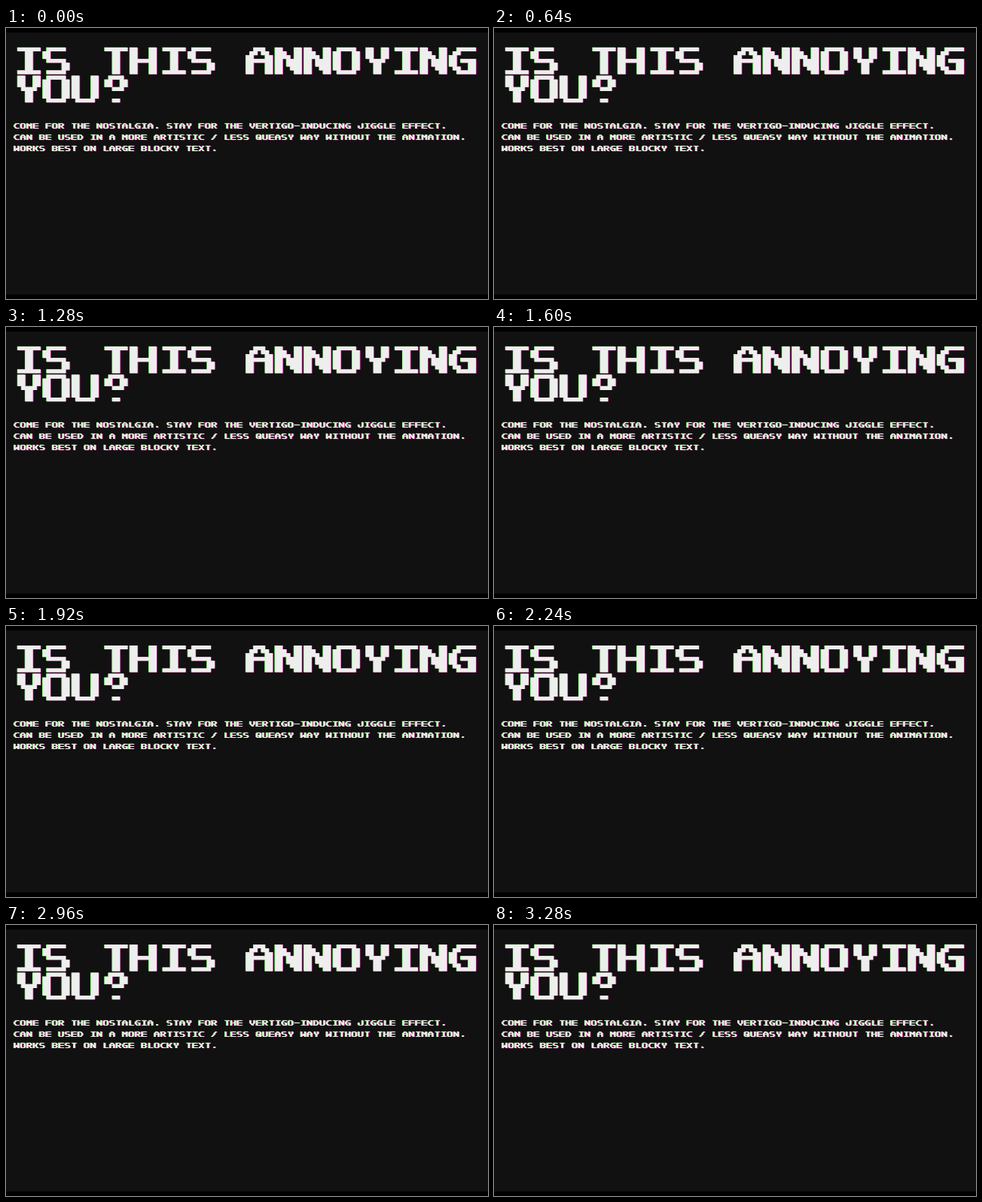
Write an HTML page with a canvas that moves like this. It is 640 px wide and 361 px high and loops after 3360 ms.

```html
<!DOCTYPE html>
<html lang="en">
<head>
<meta charset="utf-8">
<title>Is this annoying you?</title>
<style>
  html, body { margin: 0; width: 100%; height: 100%; overflow: hidden; background: #000; }
  canvas { display: block; width: 640px; height: 361px; }
</style>
</head>
<body>
<canvas id="stage" width="640" height="361" role="img"></canvas>
<script>
const stage = document.getElementById('stage');
const ctx = stage.getContext('2d');

// Each letter is a path over nine anchors, a b c / d e f / g h i.
// A capital anchor has its corner cut off.
const paths = {
  A: 'gACi df', B: 'gaCFd dFIg', C: 'cAGi', D: 'gaCIg', E: 'cagi df',
  F: 'cag df', G: 'cAGife', H: 'ag ci df', I: 'ac gi bh', J: 'cIGd',
  K: 'ag cei de', L: 'agi', M: 'gaeci', N: 'gaic', O: 'dACIGd',
  Q: 'dACIGd ei', R: 'gaCFd ei', S: 'CADFIG', T: 'ac bh', U: 'aGIc',
  V: 'adhfc', W: 'ageic', X: 'ai cg', Y: 'aDFc eh',
  ',': 'Eh', '.': 'Eh', '-': 'df', '/': 'cg', '?': 'DACFe h'
};
const NARROW = 'ILTY?', DEEP_CUT = 'ACDG,.';

function corners(path, left, cut) {
  const nodes = [...path].map(key => {
    const n = 'abcdefghi'.indexOf(key.toLowerCase());
    return { x: left + (5 - left) * (n % 3) / 2, y: 3 * Math.floor(n / 3), soft: key < 'a' };
  });
  const toward = (p, q) => ({
    x: p.x + cut * Math.sign(q.x - p.x),
    y: p.y + cut * Math.sign(q.y - p.y)
  });
  return nodes.flatMap((p, i) => p.soft
    ? [nodes[i - 1], nodes[i + 1]].filter(Boolean).map(q => toward(p, q))
    : [p]);
}

const text = new Path2D();

// Walks each path in whole blocks with a pen two wide and one high.
function addLetter(letter, x, y, block) {
  const left = NARROW.includes(letter) ? 1 : 0;
  const cut = DEEP_CUT.includes(letter) ? 2 : 1;
  for (const path of paths[letter].split(' ')) {
    const points = corners(path, left, cut);
    points.forEach((to, i) => {
      const from = points[i - 1] || to;
      const dx = to.x - from.x, dy = to.y - from.y;
      const steps = Math.ceil(Math.max(Math.abs(dx), Math.abs(dy), 1));
      for (let s = 0; s <= steps; s++) {
        const col = Math.round(from.x + dx * s / steps);
        const row = Math.round(from.y + dy * s / steps);
        text.rect(x + col * block, y + row * block, 2 * block, block);
      }
    });
  }
}

// Page scale; a letter advances by its font size plus 2 px of spacing.
const SCALE = 0.47;

function addLines(lines, x, y, size, leading) {
  const pitch = (size + 2) * SCALE, block = size * SCALE / 7.4;
  lines.forEach((line, row) => [...line].forEach((letter, i) => {
    if (letter !== ' ') addLetter(letter, x + i * pitch, y + row * leading, block);
  }));
}

const title = ['IS THIS ANNOYING', 'YOU?'];
const note = [
  'COME FOR THE NOSTALGIA, STAY FOR THE VERTIGO-INDUCING JIGGLE EFFECT.',
  'CAN BE USED IN A MORE ARTISTIC / LESS QUEASY WAY WITHOUT THE ANIMATION.',
  'WORKS BEST ON LARGE BLOCKY TEXT.'
];
stage.setAttribute('aria-label', [...title, ...note].join(' '));
addLines(title, 10.3, 26, 80, 37.6);
addLines(note, 10.6, 126.9, 16, 15);

function paint(color, dx, dy, blur) {
  ctx.save();
  ctx.filter = blur > 0.02 ? `blur(${blur.toFixed(2)}px)` : 'none';
  ctx.translate(dx * SCALE, dy * SCALE);
  ctx.fillStyle = color;
  ctx.fill(text);
  ctx.restore();
}

const LOOP = 3360, STEP = 80;

// Flicker level from 0 to 1, new at each step.
function level(step) {
  const v = Math.sin(step * 12.9898 + 1) * 43758.5453;
  return v - Math.floor(v);
}

let shown = -1;
function draw() {
  const step = Math.floor(performance.now() % LOOP / STEP);
  if (step !== shown) {
    shown = step;
    const k = level(step);
    ctx.fillStyle = '#000';
    ctx.fillRect(0, 0, 640, 361);
    ctx.fillStyle = '#111';
    ctx.fillRect(0, 6, 640, 349);
    paint('#75fa69', k - 2, -k / 2, k * SCALE);
    paint('#ea36af', k + 1, k / 2, k * SCALE);
    paint('#eee', 0, 0, 0);
  }
  requestAnimationFrame(draw);
}
draw();
</script>
</body>
</html>
```
